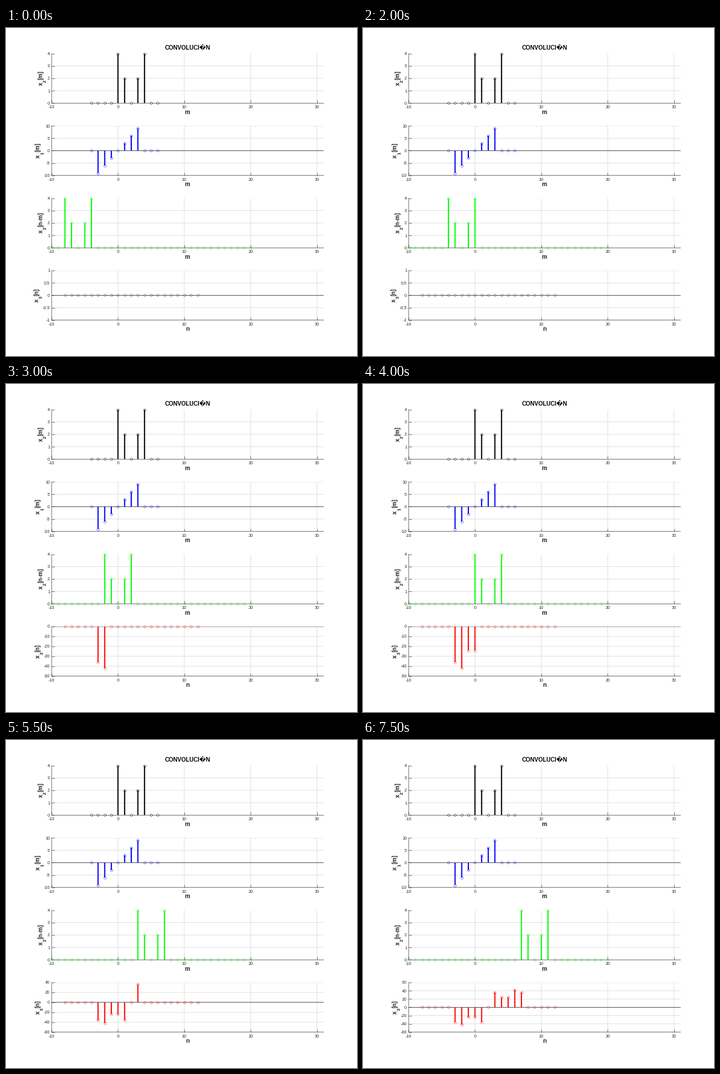
These frames come from a looping animation (600 by 560 pixels, 8000 ms). A matplotlib script:

```python
import math

import matplotlib.pyplot as plt
import numpy as np
from matplotlib.animation import FuncAnimation

W, H, DPI = 600, 560, 100
FRAMES, STEP_MS = 16, 500
PX = 72 / DPI  # points per pixel
HAIR = 0.62 * PX
INK = "#262626"

plt.rcParams.update({
    "font.family": ["Liberation Sans", "DejaVu Sans"],
    "axes.unicode_minus": False,
    "path.snap": False,
    "toolbar": "None",
})

fig = plt.figure(figsize=(W / DPI, H / DPI), dpi=DPI, facecolor="white")


def label(x, y, text, size=10, **kw):
    """Bold text at pixel coordinates measured from the top left."""
    return fig.text(x / W, 1 - y / H, text, fontsize=size * PX,
                    fontweight="bold", color=kw.pop("color", INK),
                    va="baseline", **kw)


def side_label(x, y, sub, rest, length):
    """Rotated label x_sub[rest]; y is the middle, length its extent."""
    start = y + length / 2
    parts = [(0, 0, "x", 10), (6.5, 5.8, sub, 8), (0, 10.6, f"[{rest}]", 10)]
    return [label(x + dx, start - dy, text, size, ha="left", rotation=90,
                  rotation_mode="anchor") for dx, dy, text, size in parts]


class Panel:
    def __init__(self, row, color, xname):
        self.bottom = 128.3 + 123.5 * row
        height = 84.8
        self.middle = self.bottom - height / 2
        ax = self.ax = fig.add_axes(
            [78 / W, 1 - self.bottom / H, 465 / W, height / H])
        ax.set_xlim(-10, 31)
        ax.set_xticks(range(-10, 31, 10))
        ax.patch.set_visible(False)
        ax.set_axisbelow(True)
        ax.grid(color="#d8d8d8", linewidth=0.8 * PX)
        for side in ("top", "right"):
            ax.spines[side].set_visible(False)
        for side in ("left", "bottom"):
            ax.spines[side].set(color=INK, linewidth=HAIR)
        ax.tick_params(direction="in", length=4.6 * PX, width=HAIR,
                       color=INK, labelcolor=INK, labelsize=7.2 * PX)
        ax.tick_params(axis="x", pad=4 * PX)
        ax.tick_params(axis="y", pad=3 * PX)
        label(310.3, self.bottom + 18.3, xname, ha="center")

        ax.axhline(0, color="black", linewidth=HAIR, zorder=2.6)
        self.stems = ax.vlines([], [], [], color=color, linewidth=2 * PX,
                               zorder=3)
        self.dots, = ax.plot([], [], "o", markersize=4 * PX, color=color,
                             markerfacecolor="none",
                             markeredgewidth=0.45 * PX, clip_on=False,
                             zorder=4)

    def set_scale(self, lo, hi, step):
        self.ax.set_ylim(lo, hi)
        ticks = np.arange(lo, hi + step / 2, step)
        self.ax.set_yticks(ticks, [f"{t:g}" for t in ticks])

    def set_data(self, x, y):
        self.stems.set_segments([[(a, 0), (a, b)] for a, b in zip(x, y) if b])
        self.dots.set_data(x, y)


def nice_scale(values):
    """Round limits and tick step around the values and zero."""
    lo, hi = min(values.min(), 0), max(values.max(), 0)
    if lo == hi:
        return -1, 1, 0.5
    raw = (hi - lo) / 5
    base = 10 ** math.floor(math.log10(raw))
    lead = raw / base
    mult = 1 if lead < 2 ** 0.5 else 2 if lead < 10 ** 0.5 else \
        5 if lead < 50 ** 0.5 else 10
    step = mult * base
    return math.floor(lo / step) * step, math.ceil(hi / step) * step, step


def pulse(m):
    return np.select([(m == 0) | (m == 4), (m == 1) | (m == 3)], [4, 2], 0)


m_short = np.arange(-4, 7)
m_long = np.arange(-10, 21)
n_axis = np.arange(-8, 13)
ramp = np.where(abs(m_short) <= 3, 3 * m_short, 0)
result = np.array([(ramp * pulse(n - m_short)).sum() for n in n_axis])

label(310.3, 37, "CONVOLUCI\ufffdN", color="black", ha="center")

fixed = Panel(0, "black", "m")
fixed.set_scale(0, 4, 1)
fixed.set_data(m_short, pulse(m_short))
side_label(62.5, fixed.middle, "2", "m", 25)

signal = Panel(1, "#0000ff", "m")
signal.set_scale(-10, 10, 5)
signal.set_data(m_short, ramp)
side_label(57.5, signal.middle, "1", "m", 25)

sliding = Panel(2, "#00ff00", "m")
sliding.set_scale(0, 4, 1)
side_label(62.5, sliding.middle, "2", "n-m", 34)

output = Panel(3, "#ff0000", "n")
wide_label = side_label(55.5, output.middle, "3", "n", 22.5)
near_label = side_label(57.5, output.middle, "3", "n", 22.5)


def draw(i):
    n = i - 8
    sliding.set_data(m_long, pulse(m_long - n))
    partial = np.where(n_axis <= n, result, 0)
    output.set_scale(*nice_scale(partial))
    output.set_data(n_axis, partial)
    flat = not partial.any()
    output.dots.set_markeredgecolor("#404040" if flat else "#ff0000")
    for text in wide_label:
        text.set_visible(flat)
    for text in near_label:
        text.set_visible(not flat)
    return []


anim = FuncAnimation(fig, draw, frames=FRAMES, init_func=lambda: draw(0),
                     interval=STEP_MS, repeat=True, repeat_delay=0)
plt.show()
```
